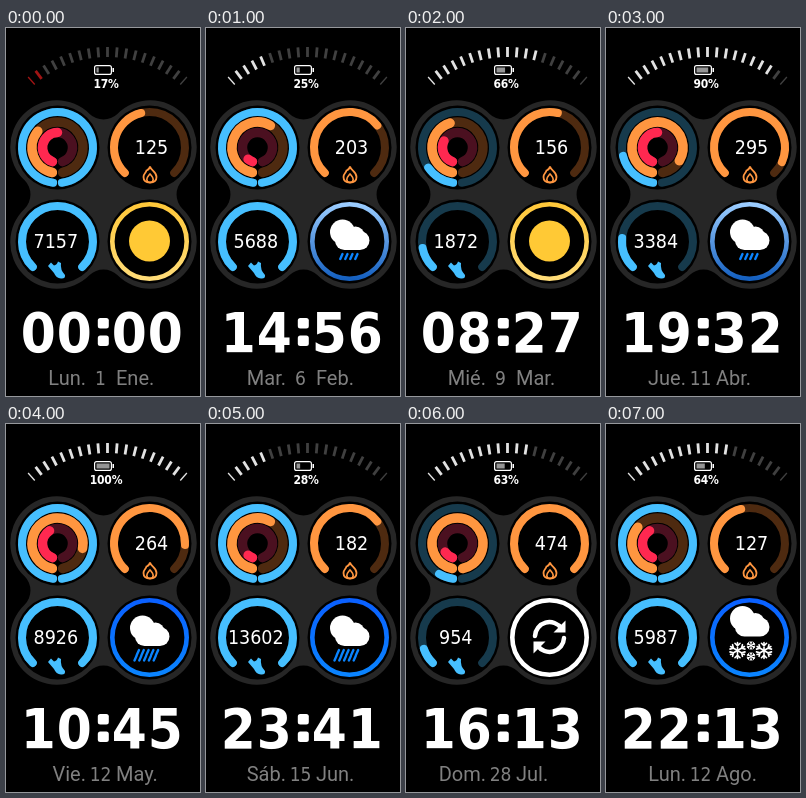
These frames come from a looping animation (194 px wide and 368 px high, 8 s). An HTML page:

```html
<!DOCTYPE html>
<html lang="es">
<head>
<meta charset="utf-8">
<style>
html, body { margin: 0; width: 100%; height: 100%; overflow: hidden; background: #000; }
svg { display: block; width: 194px; height: 368px; }
text { fill: #fff; text-anchor: middle; font-family: "DejaVu Sans Condensed", "DejaVu Sans", sans-serif; font-stretch: condensed; }
.pct { font-size: 12px; font-weight: 700; letter-spacing: -.2px; }
.num { font-size: 19.5px; }
.time { font-size: 56px; font-weight: 700; }
.day { font-size: 19px; fill: #808080; }
.word { font: 20px Roboto, sans-serif; fill: #808080; }
</style>
</head>
<body>
<svg id="face" viewBox="0 0 194 368">
  <defs>
    <linearGradient id="gold" x1="0" y1="0" x2="0" y2="1">
      <stop stop-color="#ffc83a"/><stop offset="1" stop-color="#ffdc78"/>
    </linearGradient>
    <linearGradient id="sky" x1="0" y1="0" x2="0" y2="1">
      <stop stop-color="#9accff"/><stop offset="1" stop-color="#1560c0"/>
    </linearGradient>
    <linearGradient id="deep" x1="0" y1="0" x2="0" y2="1">
      <stop stop-color="#0a60ff"/><stop offset="1" stop-color="#0a84ff"/>
    </linearGradient>
  </defs>
  <g id="base"></g>
  <g id="live"></g>
</svg>
<script>
const STEP = 1000;
const LEFT = 51.5, RIGHT = 143.5, TOP = 119.5, LOW = 213.5;
const BLUE = ['#46bfff', '#163a4c'], ORANGE = ['#ff9640', '#4e2a10'], RED = ['#ff2850', '#4b1020'];

// rings: share of steps, calories and exercise; dials: share of the two open dials
const states = [
  { time: '0000', date: ['Lun.', 1, 'Ene.'], power: 17, steps: 7157, cal: 125, rings: [1, .35, .5], dials: [1, .45], sky: 'sun' },
  { time: '1456', date: ['Mar.', 6, 'Feb.'], power: 25, steps: 5688, cal: 203, rings: [1, .59, .06], dials: [1, .69], sky: 'shower' },
  { time: '0827', date: ['Mié.', 9, 'Mar.'], power: 66, steps: 1872, cal: 156, rings: [.14, .45, .3], dials: [.13, .55], sky: 'sun' },
  { time: '1932', date: ['Jue.', 11, 'Abr.'], power: 90, steps: 3384, cal: 295, rings: [.2, .86, .5], dials: [.19, .92], sky: 'shower' },
  { time: '1045', date: ['Vie.', 12, 'May.'], power: 100, steps: 8926, cal: 264, rings: [1, .8, .4], dials: [1, .84], sky: 'rain' },
  { time: '2341', date: ['Sáb.', 15, 'Jun.'], power: 28, steps: 13602, cal: 182, rings: [1, .59, .06], dials: [1, .69], sky: 'rain' },
  { time: '1613', date: ['Dom.', 28, 'Jul.'], power: 63, steps: 954, cal: 474, rings: [.07, 1, .11], dials: [.1, 1], sky: 'sync' },
  { time: '2213', date: ['Lun.', 12, 'Ago.'], power: 64, steps: 5987, cal: 127, rings: [1, .35, .4], dials: [1, .45], sky: 'snow' }
];

const text = (cls, x, y, s, extra = '') => `<text class="${cls}" x="${x}" y="${y}" ${extra}>${s}</text>`;
const disc = (x, y, r, fill) => `<circle cx="${x}" cy="${y}" r="${r}" fill="${fill}"/>`;
const block = (x, y, w, h, rx, fill = '#fff') =>
  `<rect x="${x}" y="${y}" width="${w}" height="${h}" rx="${rx}" fill="${fill}"/>`;
const line = (d, color, w) =>
  `<path d="${d}" fill="none" stroke="${color}" stroke-width="${w}" stroke-linecap="round"/>`;

// Angles run clockwise from the bottom
function arc(cx, cy, r, from, to, color, w) {
  const at = a => `${(cx - r * Math.sin(a)).toFixed(2)} ${(cy + r * Math.cos(a)).toFixed(2)}`;
  return line(`M${at(from)}A${r} ${r} 0 ${to - from > Math.PI ? 1 : 0} 1 ${at(to)}`, color, w);
}

function meter(cx, cy, r, w, pad, share, [lit, dim]) {
  const end = 2 * Math.PI - pad;
  return arc(cx, cy, r, pad, end, dim, w) + arc(cx, cy, r, pad, pad + (end - pad) * share, lit, w);
}

function plate() {
  const R = 46.5, f = 20, dx = (RIGHT - LEFT) / 2, dy = (LOW - TOP) / 2;
  const mx = LEFT + dx, my = TOP + dy;
  const ox = Math.sqrt((R + f) ** 2 - dy ** 2), oy = Math.sqrt((R + f) ** 2 - dx ** 2);
  const k = R / (R + f);
  const side = { x: dx + ox * k, y: dy - dy * k }, cap = { x: dx - dx * k, y: dy + oy * k };
  const p = (q, sx, sy) => `${mx + q.x * sx} ${my + q.y * sy}`;
  const big = `A${R} ${R} 0 1 1 `, small = `A${f} ${f} 0 0 0 `;
  return `<path fill="#262626" d="M${p(side, -1, -1)}${big}${p(cap, -1, -1)}${small}${p(cap, 1, -1)}` +
    `${big}${p(side, 1, -1)}${small}${p(side, 1, 1)}${big}${p(cap, 1, 1)}${small}${p(cap, -1, 1)}` +
    `${big}${p(side, -1, 1)}${small}${p(side, -1, -1)}Z"/>`;
}

function gauge(power) {
  const count = 19, mid = (count - 1) / 2, low = power < 20;
  const lit = low ? 2 : Math.round(count * power / 100);
  let out = '';
  for (let i = 0; i < count; i++) {
    const color = i < lit ? (low ? '#a01414' : '#e2e2e2') : '#404040';
    const w = i % (count - 1) ? 2.8 : 1.3;
    out += `<path d="M101.5 19V29" stroke="${color}" stroke-width="${w}" transform="rotate(${(i - mid) * 4.6} 101.5 139)"/>`;
  }
  return out;
}

const battery = power =>
  '<rect x="88.6" y="37.6" width="16.8" height="8.8" rx="2" fill="none" stroke="#fff" stroke-width="1.2"/>' +
  block(106.5, 40, 1.5, 4, 0) + block(90.5, 39.5, 13 * power / 100, 5, 0, '#959595') +
  text('pct', 100, 60, power + '%');

const cloud = y => `<g transform="translate(0 ${y})">` + disc(136.5, 204, 12.5, '#fff') +
  disc(149.5, 207.5, 9, '#fff') + block(129, 203, 34.5, 19, 9.5) + '</g>';

const drops = (n, x, y, gap, len) => Array.from({ length: n }, (_, i) =>
  line(`M${x + i * gap} ${y}l${-len * .45} ${len}`, '#0a84ff', 2.4)).join('');

function flake(x, y, r, w) {
  let out = '';
  for (let a = 0; a < 360; a += 60) {
    out += `<g transform="translate(${x} ${y}) rotate(${a})">` +
      line(`M0 0V${-r}M${-r * .32} ${-r * .9}L0 ${-r * .58}L${r * .32} ${-r * .9}`, '#fff', w) + '</g>';
  }
  return out;
}

const arrow = turn => `<g transform="rotate(${turn} 143.5 213)">` +
  line('M129 212A14.5 14.5 0 0 1 155.5 204.5', '#fff', 4.5) +
  '<path d="M159.5 196.5V208.5H147.5Z" fill="#fff"/></g>';

const skies = {
  sun: ['url(#gold)', () => disc(RIGHT, 213, 20.5, '#ffc935')],
  shower: ['url(#sky)', () => cloud(0) + drops(4, 136.5, 226, 5, 5)],
  rain: ['url(#deep)', () => cloud(0) + drops(5, 133, 226, 4.8, 5) + drops(5, 130.5, 232, 4.8, 4.5)],
  snow: ['url(#deep)', () => cloud(-9.5) + flake(131.5, 226.5, 8, 1.6) + flake(158, 226.5, 8, 1.6) +
    flake(145, 221.5, 4, 1) + flake(145, 232.5, 4, 1)],
  sync: ['#fff', () => arrow(0) + arrow(180)]
};

function weather(name) {
  const [color, icon] = skies[name];
  return `<circle cx="${RIGHT}" cy="${LOW}" r="37.2" fill="none" stroke="${color}" stroke-width="4.6"/>` + icon();
}

function clock(time) {
  const at = [32.3, 68.3, 123.3, 159.3];
  return [...time].map((c, i) => text('time', at[i], 323.8, c)).join('');
}

function draw(s) {
  const rings = [[35.5, 8, BLUE], [25.5, 9.5, ORANGE], [15, 9.5, RED]];
  const [week, day, month] = s.date;
  return gauge(s.power) + battery(s.power) +
    rings.map(([r, w, c], i) => meter(LEFT, TOP, r, w, (w / 2 + .4) / r, s.rings[i], c)).join('') +
    meter(RIGHT, TOP, 35.5, 8, .77, s.dials[1], ORANGE) +
    meter(LEFT, LOW, 35.5, 8, .77, s.dials[0], BLUE) +
    text('num', 145.5, 126, s.cal) + text('num', 49.8, 220, s.steps) +
    weather(s.sky) + clock(s.time) +
    text('word', 80, 357, week, 'style="text-anchor:end"') +
    text('day', 94.5, 357, day) +
    text('word', 110, 357, month, 'style="text-anchor:start"');
}

document.getElementById('base').innerHTML = plate() +
  [LEFT, RIGHT].map(x => disc(x, TOP, 42, '#000') + disc(x, LOW, 42, '#000')).join('') +
  line('M144 138.5C145 142.5 150.5 143.5 150.5 149C150.5 152.5 148 154.5 144 154.5S137.5 152.5 137.5 149C137.5 145.5 140 145 140.5 142.5C142.5 142 143.5 140.5 144 138.5Z', ORANGE[0], 1.8) +
  line('M144 146C146 148.5 147.2 149.5 147.2 151.2C147.2 153.5 145.5 154.5 144 154.5S140.8 153.5 140.8 151.2C140.8 149.5 142 148.5 144 146Z', ORANGE[0], 1.6) +
  `<path d="M42 238L45 234.5L48 237.5Q51 237 52 233.5L55 235Q54 242 59 247Q59.5 251 55 250.5Q50 250 48 245Z" fill="${BLUE[0]}"/>` +
  block(91.8, 290, 11, 10.5, 2.5) + block(91.8, 307.5, 11, 10.5, 2.5);

const live = document.getElementById('live');
const start = performance.now();
let shown = -1;

function tick() {
  const i = Math.floor((performance.now() - start) / STEP) % states.length;
  if (i !== shown) {
    live.innerHTML = draw(states[i]);
    shown = i;
  }
  requestAnimationFrame(tick);
}
tick();
</script>
</body>
</html>
```
